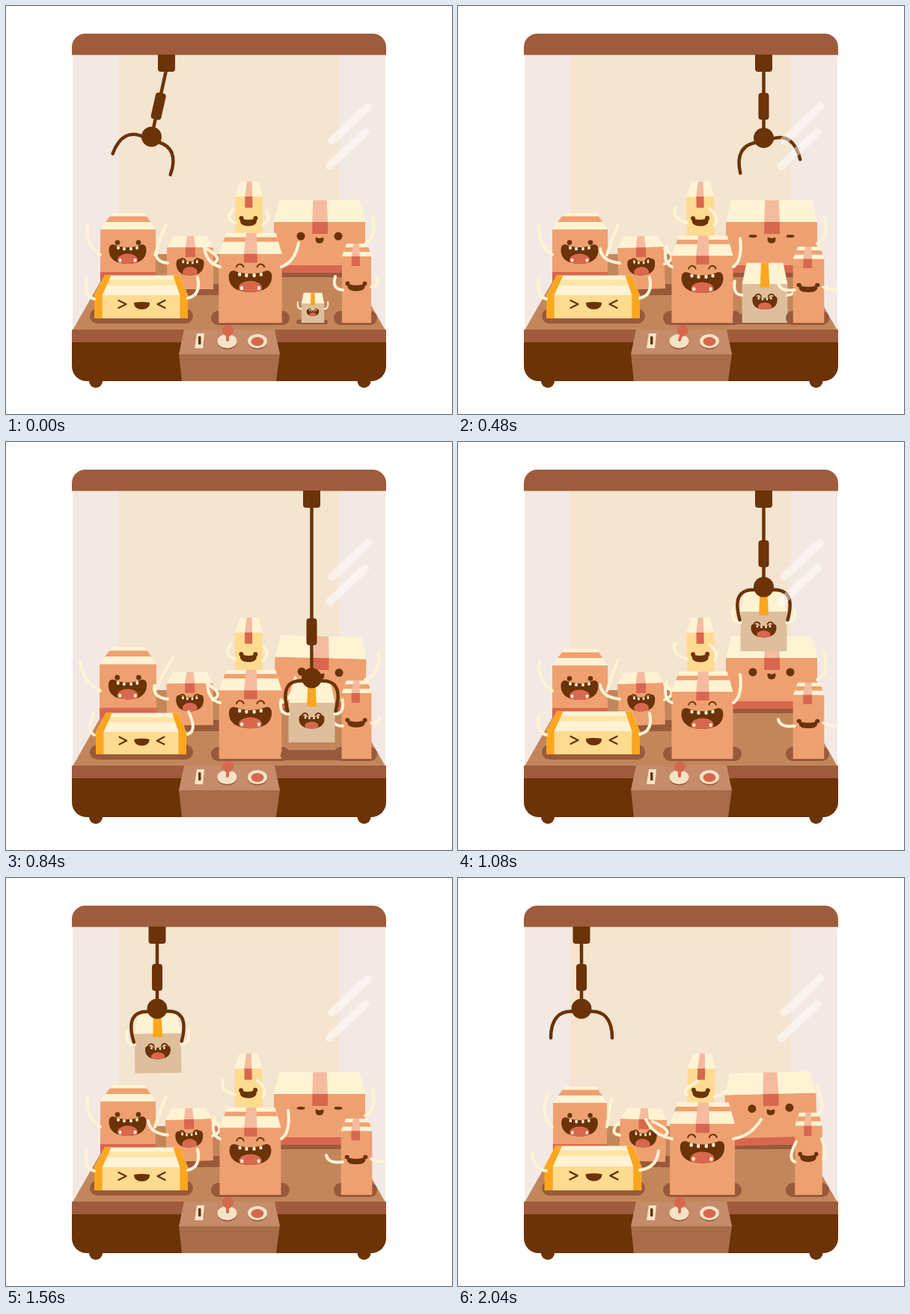
An HTML page with a canvas for the animation above (2.16 s loop, 596 by 546 pixels).

```html
<!DOCTYPE html>
<html lang="en">
<head>
<meta charset="utf-8">
<title>Claw machine</title>
<style>
html, body { margin: 0; width: 100%; height: 100%; overflow: hidden; background: #fff; }
canvas { display: block; width: 100vw; height: 100vh; }
</style>
</head>
<body>
<canvas id="stage" width="596" height="546"></canvas>
<script>
const g = document.getElementById('stage').getContext('2d');
const LOOP = 2160, STEP = 120, RAD = Math.PI / 180;
const DARK = '#6b3307', BROWN = '#9e5c3c', FLOOR = '#c3865b', SHADE = '#985a3b';
const CREAM = '#fff3d4', ORANGE = '#efa070', PALE = '#f5bb9f', RED = '#d8674e';
const SAND = '#ddbf9b', YELLOW = '#ffdb90', AMBER = '#fba61f', BISQUE = '#f6e3c5';

const clamp = u => Math.min(1, Math.max(0, u));
const mix = (a, b, u) => a + (b - a) * u;
// Halfway between linear and smoothstep
const ease = u => { u = clamp(u); return (u + u * u * (3 - 2 * u)) / 2; };
// Eased value at step s through [step, value] key points
function through(s, keys) {
  let i = 1;
  while (i < keys.length - 1 && keys[i][0] < s) i++;
  const [a, u] = keys[i - 1], [b, v] = keys[i];
  return mix(u, v, ease((s - a) / (b - a)));
}

// Two rhythms drive all the cartons
const bobAt = s => through(s, [[0, 0], [3, -1], [6, -.3], [8, -1], [10, 1], [12, -1], [14, 1], [16, 1]]);
const swayAt = s => through(s, [[0, 0], [3, 0], [6, 1], [8, 0], [10, 1], [12, 0], [15, 0], [16, -1]]);

function poly(color, ...p) {
  g.fillStyle = color;
  g.beginPath();
  for (let i = 0; i < p.length; i += 2) g.lineTo(p[i], p[i + 1]);
  g.fill();
}
function rect(color, x, y, w, h, r = 0) {
  g.fillStyle = color;
  g.beginPath();
  g.roundRect(x, y, w, h, r);
  g.fill();
}
function oval(color, x, y, rx, ry = rx) {
  g.fillStyle = color;
  g.beginPath();
  g.ellipse(x, y, rx, ry, 0, 0, 7);
  g.fill();
}
function stroke(color, w, draw) {
  g.strokeStyle = color;
  g.lineWidth = w;
  g.lineCap = g.lineJoin = 'round';
  g.beginPath();
  draw();
  g.stroke();
}
function placed(x, y, deg, draw) {
  g.save();
  g.translate(x, y);
  g.rotate(deg * RAD);
  draw();
  g.restore();
}
function around(x, y, deg, sx, sy, draw) {
  placed(x, y, deg, () => {
    g.scale(sx, sy);
    g.translate(-x, -y);
    draw();
  });
}

// Cartons: lid top at t (tl..tr), lid edge at y (l..r), bottom at b
function carton(o) {
  rect(o.color, o.l, o.y, o.r - o.l, o.b - o.y);
  poly(CREAM, o.tl, o.t, o.tr, o.t, o.r, o.y, o.l, o.y);
}
function stripe(o, a, b, color) {
  const left = f => mix(o.tl, o.l, f), right = f => mix(o.tr, o.r, f), y = f => mix(o.t, o.y, f);
  poly(color, left(a), y(a), right(a), y(a), right(b), y(b), left(b), y(b));
}
function tape(o, u, v, end, top = PALE, face = RED) {
  const hi = f => mix(o.tl, o.tr, f), lo = f => mix(o.l, o.r, f);
  poly(top, hi(u), o.t, hi(v), o.t, lo(v), o.y, lo(u), o.y);
  rect(face, lo(u), o.y, lo(v) - lo(u), end - o.y);
}

function eyes(x, gap, y, r, shut) {
  for (const d of [-1, 1]) oval(DARK, x + d * gap, y, r, shut ? r * .35 : r);
}
function happyEyes(x, gap, y, r) {
  for (const d of [-1, 1])
    stroke(DARK, 2, () => g.arc(x + d * gap, y, r, Math.PI * 1.08, Math.PI * 1.92));
}
function mouth(x, y, w, h, teeth = 0) {
  placed(x, y, 0, () => {
    g.fillStyle = DARK;
    g.beginPath();
    g.moveTo(-w / 2, -.22 * h);
    g.quadraticCurveTo(-w / 2, -.5 * h, -.38 * w, -.5 * h);
    g.quadraticCurveTo(0, -.2 * h, .38 * w, -.5 * h);
    g.quadraticCurveTo(w / 2, -.5 * h, w / 2, -.22 * h);
    g.bezierCurveTo(w / 2, .28 * h, .3 * w, .5 * h, 0, .5 * h);
    g.bezierCurveTo(-.3 * w, .5 * h, -w / 2, .28 * h, -w / 2, -.22 * h);
    g.fill();
    if (!teeth) return;
    g.clip();
    oval(RED, 0, .3 * h, .27 * w, .32 * h);
    const tw = w * .07, th = h * .17;
    for (const u of [-.25, -.09, .09, .25])
      rect(CREAM, u * w - tw / 2, (Math.abs(u) > .2 ? -.41 : -.36) * h, tw, th, tw / 3);
    if (teeth > 1) for (const u of [-.2, .2]) rect(CREAM, u * w - tw / 2, .23 * h, tw, th, tw / 3);
  });
}

// Arm from [x, y] over a bend to a tip; the tip moves by k times the swing
function arm([x, y], [bx, by], [tx, ty], k, [dx, dy]) {
  stroke(CREAM, 4, () => {
    g.moveTo(x, y);
    g.quadraticCurveTo(bx + k * dx * .4, by + k * dy * .4, tx + k * dx, ty + k * dy);
  });
}

function machine() {
  rect('#f2e9e4', 89, 60, 418, 376);
  rect('#f4e4d0', 150, 60, 295, 340);
  poly(FLOOR, 147, 332, 449, 332, 507, 434, 89, 434);
  rect(BROWN, 88, 37, 420, 28.5, [18, 18, 0, 0]);
  for (const x of [120, 478.5]) oval(DARK, x, 502, 9);
  rect(DARK, 88, 440, 420, 62, [0, 0, 20, 20]);
  rect(BROWN, 88, 433, 420, 17);
}
function panel(s) {
  poly('#a86c49', 231, 465, 366, 465, 361, 502, 235, 502);
  poly('#c68b6a', 238, 433, 359, 433, 366, 466, 231, 466);
  poly(BISQUE, 255, 438, 265, 438, 263, 458, 252, 458);
  rect(DARK, 257, 442, 3.5, 11, 1);
  for (const x of [295.5, 336]) {
    oval(SHADE, x, 450, 13, 9.5);
    oval(BISQUE, x, 448.5, 13, 9.5);
  }
  const tip = 296.5 + 4.5 * Math.sin(Math.PI * clamp(s / 4.5));
  stroke(RED, 4, () => { g.moveTo(296, 447); g.lineTo(tip, 435); });
  oval(RED, tip, 434.5, 7.5);
  oval(RED, 336, 449, 8.5, 6);
}
function glare() {
  for (const [x, y] of [[436, 180], [432, 214]])
    stroke('rgba(255,255,255,.48)', 11, () => { g.moveTo(x, y); g.lineTo(x + 48, y - 45); });
}
const pill = (x1, x2, y1, y2) => rect(SHADE, x1, y1, x2 - x1, y2 - y1, (y2 - y1) / 2);

function slim(bob, s) {
  const o = { l: 306, r: 343, y: 255, b: 312, t: 235, tl: 313, tr: 338, color: YELLOW };
  around(325, 304, bob, 1, 1, () => {
    carton(o);
    tape(o, .36, .63, 270);
    eyes(324, 9.5, 284, 3, s === 10);
    mouth(324, 289.5, 22, 10);
  });
  arm([306, 290], [291, 285], [305, 271], bob, [15, 1]);
  arm([343, 293], [355, 285], [348, 276], bob, [12, 5]);
}
function wide(sway, s) {
  const o = { l: 358, r: 480, y: 289, b: 357, t: 260, tl: 365, tr: 473, color: ORANGE };
  pill(362, 462, 347, 363);
  around(419, 350, sway * 1.5, 1, 1, () => {
    carton(o);
    rect(RED, 366, 347, 114, 10);
    tape(o, .42, .59, 305);
    eyes(419, 25, 308, 5.5, s % 9 === 3);
    mouth(419, 313.5, 11, 8);
  });
  arm([480, 318], [497, 309], [489, 281], sway, [9, 1]);
}
function toothy(sway) {
  const o = { l: 126, r: 200, y: 299, b: 370, t: 277, tl: 142, tr: 185, color: ORANGE };
  const k = 1 + .025 * sway;
  around(163, 370, 0, k, k, () => {
    carton(o);
    stripe(o, .2, .55, ORANGE);
    rect(RED, 126, 356, 74, 14);
    eyes(163, 14, 316.5, 3.3);
    mouth(162.5, 332, 50, 26, 2);
  });
  arm([126, 333], [105, 319], [109, 292], sway, [-10, 1]);
  arm([199, 333], [205, 313], [214, 292], sway, [9, -3]);
}
function small(bob) {
  const o = { l: 215, r: 277, y: 323, b: 379, t: 308, tl: 224, tr: 269, color: ORANGE };
  pill(207, 290, 372, 387);
  around(246, 379, bob * 2, 1, 1, () => {
    carton(o);
    tape(o, .4, .61, 336);
    happyEyes(246, 10, 342, 4);
    mouth(246, 349.5, 37, 22, 1);
  });
  arm([216, 344], [197, 342], [202, 326], bob, [12, 1]);
  arm([276, 345], [292, 338], [268, 325], bob, [-8, 1]);
}
function flat(sway) {
  const o = { l: 118, r: 243, y: 387, b: 418, t: 360.5, tl: 132, tr: 232, color: YELLOW };
  const k = 1 - .035 * sway;
  pill(112, 250, 405, 425);
  around(180.5, 418, 0, k, k, () => {
    carton(o);
    stripe(o, .22, .5, '#ffe4a5');
    tape(o, 0, .085, 418, AMBER, AMBER);
    tape(o, .915, 1, 418, AMBER, AMBER);
    for (const d of [-1, 1]) stroke(DARK, 2.3, () => {
      const x = 181.5 + d * 31;
      g.moveTo(x, 394);
      g.lineTo(x - d * 10, 399);
      g.lineTo(x, 404);
    });
    g.fillStyle = DARK;
    g.beginPath();
    g.moveTo(171, 397);
    g.quadraticCurveTo(181.5, 395, 192, 397);
    g.bezierCurveTo(193, 409, 170, 409, 171, 397);
    g.fill();
  });
  arm([118, 392], [104, 388], [108, 365], sway, [9, -2]);
  arm([243, 391], [261, 387], [256, 363], sway, [-12, -2]);
}
function front(bob) {
  const o = { l: 284, r: 369, y: 331, b: 424, t: 303, tl: 294, tr: 361, color: ORANGE };
  const k = .993 + .029 * bob;
  pill(274, 379, 408, 427);
  around(326.5, 424, 0, k, k, () => {
    carton(o);
    stripe(o, .2, .42, ORANGE);
    tape(o, .4, .61, 343);
    happyEyes(326.5, 14, 350, 5);
    mouth(326.5, 368, 58, 29, 2);
  });
  arm([286, 349], [267, 344], [265, 322], bob, [-14, 1]);
  arm([368, 349], [386, 343], [391, 317], bob, [14, 6]);
}
function tall(bob, s) {
  const o = { l: 449, r: 488, y: 335, b: 424, t: 318, tl: 455, tr: 483, color: ORANGE };
  pill(438, 496, 408, 427);
  around(468.5, 424, 0, 1 - .065 * bob, 1 + .038 * bob, () => {
    carton(o);
    stripe(o, .3, .65, ORANGE);
    tape(o, .33, .61, 348);
    eyes(468, 11.5, 371.5, 2.9, s === 10);
    mouth(468, 377, 23, 9);
  });
  arm([450, 380], [435, 379], [440, 362], bob, [12, -9]);
  arm([488, 376], [498, 376], [496, 364], bob, [-10, -15]);
}

// The prize carton, origin at the middle of its bottom edge
function prize() {
  const o = { l: -31, r: 31, y: -53, b: 0, t: -82, tl: -25, tr: 25, color: SAND };
  carton(o);
  tape(o, .4, .6, -48, AMBER, AMBER);
  happyEyes(0, 9, -35, 4);
  mouth(0, -27.5, 34, 18, 1);
  for (const d of [-1, 1]) arm([d * 31, -38], [d * 44, -38], [d * 41, -57], 0, [0, 0]);
}

function clawState(s) {
  const dip = Math.exp(-((s - 6) ** 2) / 2);
  const x = 165 + 243.5 * (ease((s + 1) / 4) - ease((s - 8) / 5));
  return {
    x,
    bx: x + through(s, [[0, -20], [3, 0], [8, 0], [10, 13], [12, 0]]),
    by: 175 + 141 * dip,
    gap: 42 + 20 * dip,
    tilt: through(s, [[0, 20], [3, -13], [5, 0], [8, 0], [10, -14], [12, -1], [14, 0]]),
    grip: clamp(s - 5) - clamp(s - 13)
  };
}
function claw(c) {
  const dx = c.x - c.bx, dy = 86 - c.by, n = Math.hypot(dx, dy);
  stroke(DARK, 4.5, () => { g.moveTo(c.x, 84); g.lineTo(c.bx, c.by); });
  placed(c.bx + dx / n * c.gap, c.by + dy / n * c.gap, Math.atan2(dx, -dy) / RAD,
    () => rect(DARK, -7, -18, 14, 36, 4));
  rect(DARK, c.x - 11.5, 65, 23, 23, [0, 0, 4, 4]);
  oval(DARK, c.bx, c.by, 13.5);
  placed(c.bx, c.by, c.tilt, () => {
    const m = (open, shut) => mix(open, shut, c.grip);
    for (const d of [-1, 1]) stroke(DARK, 4.5, () => {
      g.moveTo(d * 8, m(4, 4));
      g.bezierCurveTo(d * m(30, 33), m(1, 1), d * m(41, 40), m(14, 15), d * m(41, 32), m(39, 44));
    });
  });
}

function draw(s) {
  const bob = bobAt(s), sway = swayAt(s), c = clawState(s);
  const held = s >= 6 && s < 14;
  rect('#fff', 0, 0, 596, 546);
  machine();
  if (s === 14) placed(165, 322, 0, prize);
  slim(bob, s);
  wide(sway, s);
  toothy(sway);
  small(bob);
  flat(sway);
  front(bob);
  const size = mix(.49, .98, ease(s / 2.5));
  if (s < 7) pill(409 - 43 * size, 409 + 43 * size, 427 - 15 * size, 426);
  if (s < 6) placed(410, 424, 0, () => { g.scale(size, size); prize(); });
  tall(bob, s);
  if (held) placed(c.bx, c.by, c.tilt, () => { g.translate(0, 86); prize(); });
  claw(c);
  panel(s);
  glare();
}

function tick() {
  const t = performance.now() % LOOP;
  // The first pose is held for two steps
  draw(Math.max(0, Math.floor(t / STEP) - 1));
  requestAnimationFrame(tick);
}
tick();
</script>
</body>
</html>
```
